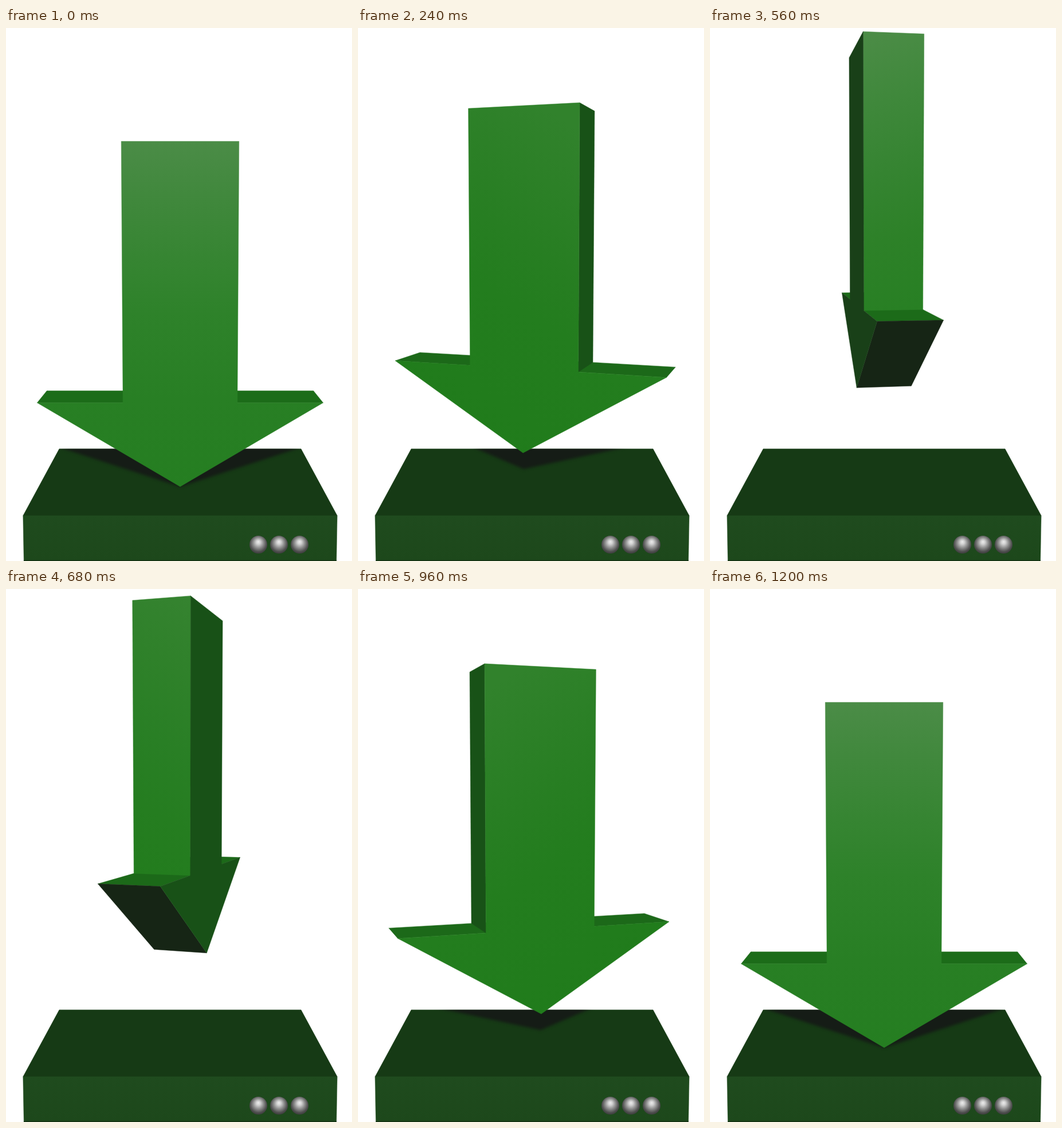
Animation of 604x928 px, one loop 1.24 s. Source, as an HTML page with a canvas:

```html
<!DOCTYPE html>
<html lang="en">
<head>
<meta charset="utf-8">
<title>Download arrow</title>
<style>
  html, body { margin: 0; width: 100%; height: 100%; overflow: hidden; background: #fff; }
  canvas { display: block; width: 604px; height: 928px; }
</style>
</head>
<body>
<canvas id="stage" width="604" height="928"></canvas>
<script>
const ctx = document.getElementById('stage').getContext('2d');

// Camera: focal length (also the distance to the axis), tilt, screen centre
const F = 1370, TILT = 5 * Math.PI / 180, CX = 304, CY = 464;
const SIN = Math.sin(TILT), COS = Math.cos(TILT);

// World: y points down, z points away, the arrow turns about x = z = 0
const U = 97.45;
const S = U, T = U / 2, H = 2.5 * U, LIFT = 1.7 * U;
const TIP = 326.6, NECK = TIP - 1.5 * U, TOP = TIP - 6 * U;
const FLOOR = 327.3, BOX_W = 243.5, BOX_D = 182.5, BOX_H = 73;
const SHADOW = 1.64; // backward throw of the light per unit of height

const STEP = 40, STEPS = 31;

// Diffuse colour by how squarely a wall faces the viewer
const SHADES = [
  [0, 26, 46, 25], [0.32, 24, 82, 23], [0.7, 22, 112, 18],
  [0.947, 31, 123, 26], [1, 36, 126, 32]
];
// Highlight strength along a wall, from its top
const GLOW = [[0, 39], [0.17, 28], [0.34, 18], [0.5, 9.5], [0.75, 3.5], [1, 1]];

const ease = t => t * t * (3 - 2 * t);
const rgb = (r, g, b) => `rgb(${Math.round(r)},${Math.round(g)},${Math.round(b)})`;

function project([x, y, z]) {
  const k = F / (F + z * COS + y * SIN);
  return [CX + x * k, CY + (y * COS - z * SIN) * k];
}

function area(pts) {
  return pts.reduce((sum, [x, y], i) => {
    const [nx, ny] = pts[(i + 1) % pts.length];
    return sum + x * ny - nx * y;
  }, 0);
}

function trace(path, pts) {
  pts.forEach(([x, y], i) => i ? path.lineTo(x, y) : path.moveTo(x, y));
  path.closePath();
  return path;
}

function fill(pts, paint) {
  const path = trace(new Path2D(), pts);
  ctx.fillStyle = ctx.strokeStyle = paint;
  ctx.lineWidth = 0.5;
  ctx.lineJoin = 'round';
  ctx.fill(path);
  ctx.stroke(path);
}

function shade(c) {
  let i = 1;
  while (i < SHADES.length - 1 && c > SHADES[i][0]) i++;
  const a = SHADES[i - 1], b = SHADES[i];
  const m = (c - a[0]) / (b[0] - a[0]);
  return [1, 2, 3].map(n => a[n] + (b[n] - a[n]) * m);
}

function wallPaint(facing, nx, pts, rise) {
  const [r, g, b] = shade(facing);
  const angle = Math.acos(Math.min(1, facing)) * 180 / Math.PI;
  const power = Math.exp(-((angle / 20) ** 2)) * (1 + 0.25 * rise);
  const x = CX + nx * (T + S) / 2 - nx * 100;
  const y = Math.min(...pts.map(p => p[1]));
  const len = 601 + 100 * rise, norm = Math.hypot(2 * nx, 1);
  const grad = ctx.createLinearGradient(x, y, x + 2 * nx * len / norm, y + len / norm);
  for (const [at, glow] of GLOW) {
    const add = glow * power;
    grad.addColorStop(at, rgb(r + add, g + add * 0.37, b + add));
  }
  return grad;
}

function drawBox(headFaces) {
  const quad = pts => pts.map(project);
  const top = quad([[-BOX_W, FLOOR, BOX_D], [BOX_W, FLOOR, BOX_D],
                    [BOX_W, FLOOR, -BOX_D], [-BOX_W, FLOOR, -BOX_D]]);
  const low = FLOOR + BOX_H;
  const front = quad([[-BOX_W, FLOOR, -BOX_D], [BOX_W, FLOOR, -BOX_D],
                      [BOX_W, low, -BOX_D], [-BOX_W, low, -BOX_D]]);
  fill(top, '#163a15');

  const cast = new Path2D();
  for (const face of headFaces) {
    const pts = face.map(([x, y, z]) => project([x, FLOOR, z + (FLOOR - y) * SHADOW]));
    trace(cast, area(pts) < 0 ? pts.reverse() : pts);
  }
  ctx.save();
  ctx.clip(trace(new Path2D(), top));
  ctx.filter = 'blur(2.5px)';
  ctx.fillStyle = '#151c16';
  ctx.fill(cast);
  ctx.restore();

  const grad = ctx.createLinearGradient(0, 849, 0, 928);
  grad.addColorStop(0, '#1f4b1e');
  grad.addColorStop(1, '#1d481b');
  fill(front, grad);
  ctx.fillStyle = '#143214';
  ctx.fillRect(31, 926.5, 546, 1.5);

  for (const x of [440.5, 476.5, 512.5]) {
    const ball = ctx.createRadialGradient(x, 894.5, 0, x, 898, 18);
    ball.addColorStop(0, '#ececec');
    ball.addColorStop(0.2, '#d2d2d2');
    ball.addColorStop(0.5, '#8e8e8e');
    ball.addColorStop(0.8, '#4f4f4f');
    ball.addColorStop(1, '#383838');
    ctx.fillStyle = ball;
    ctx.beginPath();
    ctx.arc(x, 899.5, 15.5, 0, 7);
    ctx.fill();
  }
}

function draw(step) {
  const t = step / (STEPS - 1);
  const turn = Math.PI * ease(t), rise = ease(1 - Math.abs(2 * t - 1));
  const c = Math.cos(turn), s = Math.sin(turn);
  const place = ([a, y, d]) => [a * c - d * s, y - LIFT * rise, -a * s - d * c];
  const solid = pts => pts.map(place);

  const slab = d => solid([[-S, TOP, d], [S, TOP, d], [S, NECK, d], [H, NECK, d],
                           [0, TIP, d], [-H, NECK, d], [-S, NECK, d]]);
  const tri = d => solid([[-H, NECK, d], [H, NECK, d], [0, TIP, d]]);
  const slant = e => solid([[e * H, NECK, T], [e * H, NECK, -T], [0, TIP, -T], [0, TIP, T]]);
  const side = e => solid([[e * S, TOP, e * T], [e * S, TOP, -e * T],
                           [e * S, NECK, -e * T], [e * S, NECK, e * T]]);
  const deck = solid([[-H, NECK, -T], [H, NECK, -T], [H, NECK, T], [-H, NECK, T]]);
  const slants = [slant(1), slant(-1).reverse()];

  ctx.fillStyle = '#fff';
  ctx.fillRect(0, 0, 604, 928);
  drawBox([tri(T), tri(-T), deck, ...slants]);

  fill(deck.map(project), rgb(28, 103.5 + 4 * Math.cos(4 * turn), 25));
  for (const face of slants) {
    const pts = face.map(project);
    if (area(pts) > 0) fill(pts, '#162515');
  }

  // Each wall: points, facing towards the viewer, sideways part of its normal
  const walls = [
    [side(1), s, c], [side(-1), -s, -c],
    [slab(T), c, -s], [slab(-T).reverse(), -c, s]
  ];
  for (const [face, facing, nx] of walls) {
    const pts = face.map(project);
    if (area(pts) > 0) fill(pts, wallPaint(Math.max(0, facing), nx, pts, rise));
  }
}

let shown = -1;
const start = performance.now();
function tick() {
  const step = Math.floor((performance.now() - start) / STEP) % STEPS;
  if (step !== shown) draw(shown = step);
  requestAnimationFrame(tick);
}
tick();
</script>
</body>
</html>
```
